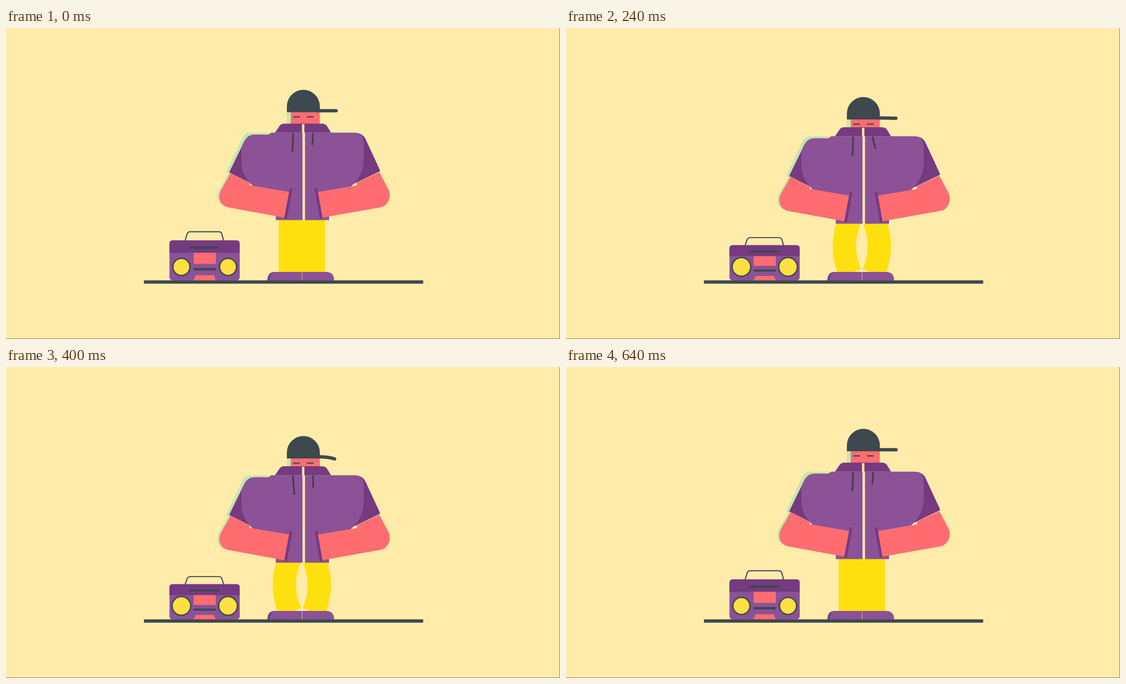
Animation of 998x561 px, one loop 0.72 s. Source, as an HTML page:

```html
<!DOCTYPE html>
<html lang="en">
<head>
<meta charset="utf-8">
<title>Bouncing to the beat</title>
<style>
  html, body { margin: 0; width: 100%; height: 100%; overflow: hidden; background: #ffecab; }
  svg { display: block; width: 100vw; height: 100vh; }
  .purple { fill: #8b5297; }
  .deep { fill: #753a80; }
  .red { fill: #ff6d70; }
  .dark { fill: #3d484f; }
  .mint { fill: #c3e8ac; }
  .cream { fill: #ffecab; }
  .line { fill: none; stroke: #3d484f; stroke-linecap: round; }
  .leg { fill: none; stroke: #ffe00f; stroke-width: 42; }
  .cord { fill: none; stroke: #423f42; stroke-width: 3; stroke-linecap: round; }
  .speaker { fill: #ffe043; stroke: #3d484f; stroke-width: 2.5; }
</style>
</head>
<body>
<svg viewBox="0 0 998 561" preserveAspectRatio="none">
  <rect class="cream" width="998" height="561"/>
  <path d="M0 560.5H997.5V0" fill="none" stroke="#8f8666"/>

  <g id="radio">
    <path class="line" stroke-width="2" d="M322.5 384L326 372.5Q327.500 367.500 332 367.500H383Q388 367.500 389 372L392 384"/>
    <rect class="purple" x="294.500" y="383" width="126.500" height="72.500" rx="6"/>
    <path class="deep" d="M294.500 405.500V389Q294.500 383 300.500 383H415Q421 383 421 389V405.500Z"/>
    <rect class="dark" x="330" y="394" width="54" height="4.200"/>
    <rect class="red" x="338" y="405.500" width="40" height="20"/>
    <rect class="dark" x="338" y="433" width="40" height="4.200"/>
    <path class="red" d="M341.500 446H374.500L378 455.500H338Z"/>
  </g>
  <circle class="speaker" cx="316" cy="431" r="15.500"/>
  <circle class="speaker" cx="400" cy="431" r="15.500"/>

  <path class="leg" id="legL"/>
  <path class="leg" id="legR"/>
  <path class="deep" d="M471 455.500V453Q472 440 485 440H500V455.500Z"/>
  <path class="purple" d="M475 455.500V453Q476 440 489 440H533V455.500Z"/>
  <path class="purple" d="M533.600 455.500V440H577Q590 440.500 591 453V455.500Z"/>
  <rect class="dark" x="248.500" y="455.200" width="503" height="6"/>

  <g id="head">
    <rect class="mint" x="506" y="150" width="8" height="30"/>
    <rect class="red" x="513" y="150" width="52.300" height="30"/>
    <path class="line" id="brim" stroke-width="6"/>
    <path class="dark" d="M506 152V141.300A29.700 29.700 0 0 1 565.400 141.300V152Z"/>
    <path class="line" stroke-width="2.200" style="stroke-linecap:butt" d="M517 160.400H529.500M542 160.400H554"/>
  </g>

  <g id="body">
    <path class="mint" d="M478 188.700H441Q430 189 426 198L397.500 258Q396.500 261 400.500 263L383.500 292C377 306 382 316 391 321L450 285V195Z"/>
    <path class="deep" d="M430 203L402 260.500L441 280L447 270V203Z"/>
    <path class="deep" d="M630 189C640 190 645 194 648 201L673.500 256Q674.500 258 672.500 259L627 281V200Z"/>
    <path class="purple" d="M478 188.700H628C639 189 644.500 196 644.500 208V236C644 258 636 274 618 289L582 302V346.600H486V302L449 288.500C431 274 424 258 424 240V215L430 203Q436 192.300 447 192.300H471Q474 192 478 188.700Z"/>
    <path class="red" d="M439.500 279.500L404.500 261.800L387.500 292C380 306 386 321 400 323.600L502 342.300L511.500 296L438.500 283.500Z"/>
    <path class="red" d="M632 279L672.500 260L688.500 290C696 304 688 321 675 323.400L569 342.300L561 296L632 284Z"/>
    <path class="deep" d="M511.200 289L516 290L506 344.300L501 343.500Z"/>
    <path class="deep" d="M560.800 289L556 290L565.500 344.300L570.300 343.500Z"/>
    <path class="deep" d="M484.500 188.800L493 176.500Q496 172.500 501 172.500H569Q575 172.500 578 176.500L585.500 188.800Z"/>
    <rect class="cream" x="533.300" y="173.500" width="4.200" height="15.500"/>
    <rect class="cream" x="534.200" y="188.700" width="4.400" height="158"/>
    <path class="cord" id="cordL"/>
    <path class="cord" id="cordR"/>
  </g>
</svg>
<script>
  const STEP = 80, STEPS = 9;
  // Trailing parts, one offset per step
  const brimLift = [0, -5, -2.5, 0.7, 2.4, 3.7, 4.5, 4, 0];
  const swingL = [-1.3, -4.3, -3.5, -1, 1, 2.5, 3, 2.5, -1.3];
  const swingR = [-1.3, 3.5, 5, 4.5, 2.5, 0.3, -1.8, -2.8, -1.3];

  const $ = id => document.getElementById(id);
  const set = (id, name, value) => $(id).setAttribute(name, value);
  const speakers = document.querySelectorAll('.speaker');

  function leg(id, x, bend, drop) {
    const hip = 337 + drop, ankle = 443;
    set(id, 'd', `M${x} ${hip}Q${x + 2 * bend} ${(hip + ankle) / 2} ${x} ${ankle}`);
  }

  function cord(id, x, length, swing) {
    set(id, 'd', `M${x} 190.500Q${x + 0.5} ${190 + length * 0.5} ${x + swing} ${190 + length}`);
  }

  function draw(time) {
    const step = Math.floor(time / STEP) % STEPS;
    const dip = Math.sin(Math.PI * step / (STEPS - 1));

    set('body', 'transform', `translate(0 ${7 * dip})`);
    set('head', 'transform', `translate(0 ${14 * dip})`);
    set('radio', 'transform', `translate(0 455.5) scale(1 ${1 - 0.13 * dip}) translate(0 -455.5)`);
    speakers.forEach(s => s.setAttribute('r', 15.4 + 1.6 * dip));

    leg('legL', 512.2, -11.6 * dip, 7 * dip);
    leg('legR', 553.8, 11.6 * dip, 7 * dip);

    const lift = brimLift[step];
    set('brim', 'd', `M560 149.2Q580 ${149.2 - lift * 0.1} ${594.6 - Math.max(0, lift) * 0.7} ${149.2 + lift}`);
    cord('cordL', 517, 32.5, swingL[step]);
    cord('cordR', 553, 20, swingR[step]);
  }

  const start = performance.now();
  function tick() {
    draw(performance.now() - start);
    requestAnimationFrame(tick);
  }
  tick();
</script>
</body>
</html>
```
